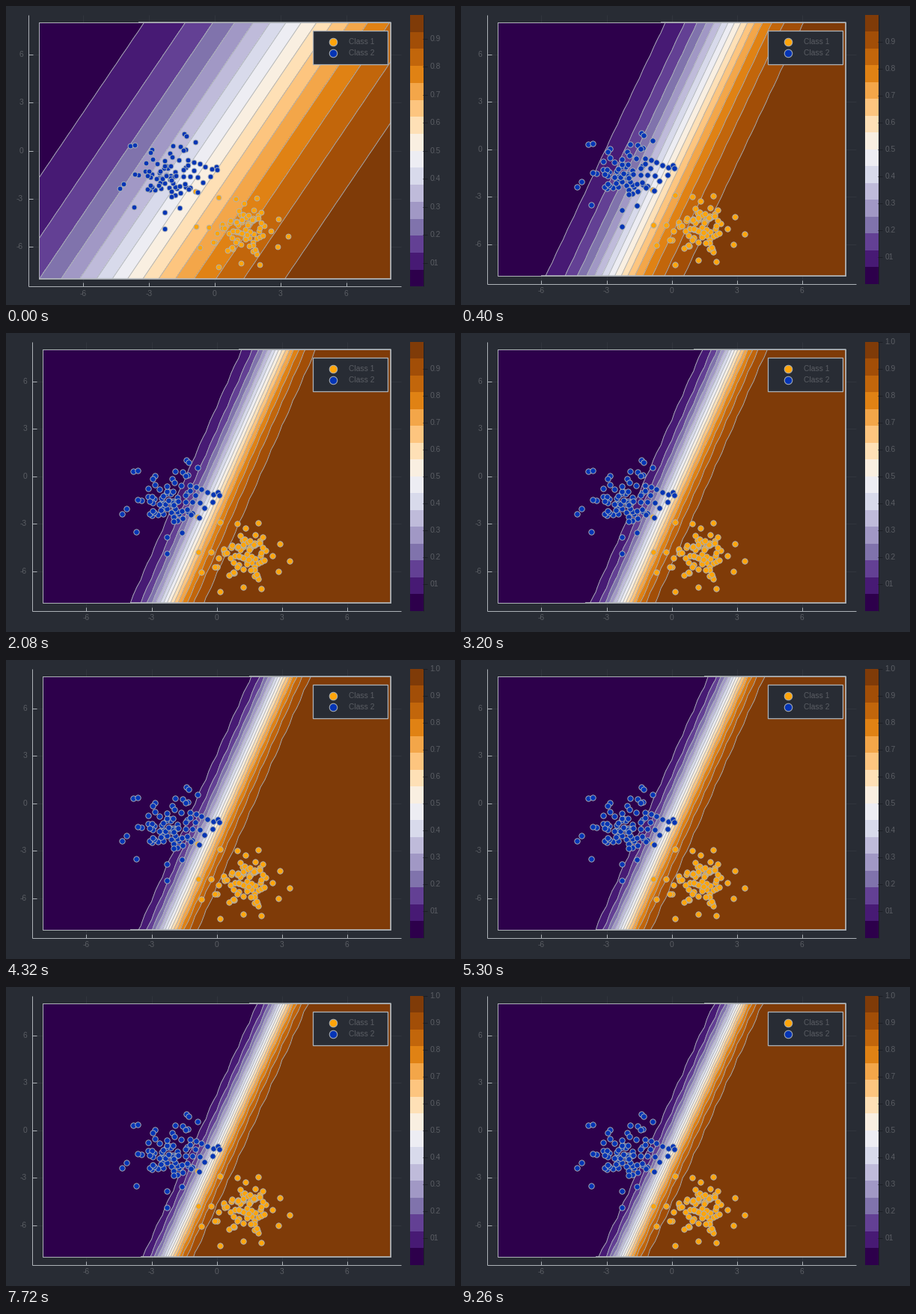
Write a matplotlib script that moves like this. It is 600 by 400 pixels and loops after 9.28 s.

```python
import numpy as np
import matplotlib.pyplot as plt
from matplotlib.animation import FuncAnimation
from matplotlib.collections import LineCollection
from matplotlib.patches import Rectangle

DPI = 100
PX = 72 / DPI                       # one pixel in points
BG, FG, TEXT, DARK = "#282c34", "#adb2b7", "#5a5d63", "#1b1e24"
ORANGE, BLUE = "#ffa50a", "#0535b5"
TICK_MS, LOOP_MS = 20, 9280
BANDS, TOP, RIGHT = 16, 12, 528
TICKS = np.arange(-6, 7, 3)

plt.rcParams["font.family"] = "Liberation Sans"
plt.rcParams["font.size"] = 10.3 * PX

fig = plt.figure(figsize=(6, 4), dpi=DPI, facecolor=BG)
ax = fig.add_axes([0, 0, 1, 1])
ax.set(xlim=(0, 600), ylim=(400, 0))
ax.axis("off")
ax.set_autoscale_on(False)

palette = plt.get_cmap("PuOr_r")(np.linspace(0, 1, BANDS))
grid = np.arange(-8, 8.01, 0.5)
gx, gy = np.meshgrid(grid, grid)


def add_lines(segs, width=1.0, color=FG, alpha=1.0, z=3):
    lc = LineCollection(segs, colors=color, linewidths=width * PX, alpha=alpha, zorder=z)
    return ax.add_collection(lc, autolim=False)


def cluster(seed, mean, spread, count, outer):
    """A round cloud of points plus a few outlying ones."""
    z = np.random.default_rng(seed).normal(size=(4 * count, 2))
    z = z[np.hypot(*z.T) < 1.95][:count]
    return np.vstack([mean + z * spread, outer])


class1 = cluster(12, (1.25, -4.9), (0.8, 0.9), 74, [
    (-0.85, -4.75), (0.95, -3.0), (1.9, -2.95), (2.9, -4.25), (3.35, -5.35), (2.85, -6.0),
    (0.15, -7.25), (2.05, -7.1), (-0.9, -2.55), (0.15, -2.9), (-0.7, -6.05), (1.2, -7.0)])
class2 = cluster(5, (-2.0, -1.3), (0.9, 0.85), 74, [
    (-4.35, -2.35), (-4.15, -2.05), (-3.85, 0.3), (-3.65, 0.35), (-3.7, -3.5), (-1.4, 1.05),
    (-1.3, 0.9), (-0.9, 0.55), (-2.3, -3.85), (-2.3, -4.85), (-1.6, -3.55), (-0.8, -2.6),
    (-0.2, -1.6), (-0.15, -1.15), (0.05, -1.0), (0.1, -1.2)])


class Layout:
    """Maps data units to stage pixels and owns the fixed artists."""

    def __init__(self, left, bottom, size):
        self.left, self.bottom = left, bottom
        self.cx, self.sx = (left + RIGHT) / 2, (RIGHT - left) / 16.96
        self.cy, self.sy = (TOP + bottom) / 2, (bottom - TOP) / 16.96
        self.artists = self.build(size)

    def x(self, v):
        return self.cx + self.sx * np.asarray(v)

    def y(self, v):
        return self.cy - self.sy * np.asarray(v)

    def build(self, size):
        l, b = self.left, self.bottom
        xs, ys = self.x(TICKS), self.y(TICKS)
        (x0, x1), (y0, y1) = self.x([-8, 8]), self.y([8, -8])
        out = [
            add_lines([[(x, TOP), (x, b)] for x in xs] + [[(l, y), (RIGHT, y)] for y in ys],
                      0.6, alpha=0.12, z=0),
            add_lines([[(l, TOP), (l, b)], [(l, b), (RIGHT, b)]]),
            add_lines([[(x, b), (x, b - 5)] for x in xs] + [[(l, y), (l + 6, y)] for y in ys]),
            add_lines([[(x0, y0), (x1, y0), (x1, y1), (x0, y1), (x0, y0)]]),
            add_lines([[(558, TOP), (558, b)]], 0.8, DARK)]
        for v, x, y in zip(TICKS, xs, ys):
            out += [ax.text(x - 0.5, b + 9.5, f"{v}", color=TEXT, ha="center", va="center"),
                    ax.text(l - 7.5, y, f"{v}", color=TEXT, ha="right", va="center")]
        step = (b - TOP) / BANDS
        for i, c in enumerate(palette):
            band = Rectangle((540, b - (i + 1) * step), 18, step, color=c, lw=0,
                             antialiased=False)
            out.append(ax.add_patch(band))
        for pts, color, z in ((class1, ORANGE, 4), (class2, BLUE, 5)):
            out.append(ax.scatter(self.x(pts[:, 0]), self.y(pts[:, 1]), s=(size * PX) ** 2,
                                  color=color, edgecolors=FG, linewidths=0.9 * PX, zorder=z))
        return out

    def show(self, on):
        for a in self.artists:
            a.set_visible(on)


first, later = Layout(30.4, 375.4, 6.8), Layout(35.4, 371.6, 7.4)

# Legend
ax.add_patch(Rectangle((410, 32.5), 100, 45.5, fc=BG, ec=FG, lw=1.3 * PX, zorder=6))
for y, color, name in ((47.7, ORANGE, "Class 1"), (62.7, BLUE, "Class 2")):
    ax.scatter(437, y, s=(10.5 * PX) ** 2, color=color, edgecolors=FG,
               linewidths=PX, zorder=7)
    ax.text(457.5, y, name, color=TEXT, va="center", zorder=7)

# Colorbar labels
bar_values = np.arange(1, 11) / 10
bar_texts = [ax.text(566.5, 0, "01" if v == 0.1 else f"{v:.1f}", color=TEXT, va="center")
             for v in bar_values]
bar_ticks = add_lines([], color=DARK)
edge = add_lines([], 1.6)


def weights(epoch):
    """Slopes along x and -y and the bias; training slows logarithmically."""
    s = np.log1p(epoch / 5)
    return (np.polyval([0.020, 0.51, 0.350], s),
            np.polyval([0.0185, 0.11, 0.173], s),
            np.polyval([-0.058, -0.07, 0.010], s))


def epoch_at(ms):
    """Three epochs per 140 ms, the middle one held for 100 ms."""
    cycle, rest = divmod(ms, 140)
    return 3 * cycle + (rest >= 20) + (rest >= 120)


state = {"epoch": None, "sets": []}


def draw_epoch(epoch):
    lay = first if epoch == 0 else later
    first.show(lay is first)
    later.show(lay is later)

    wx, wy, b = weights(epoch)
    z = 1 / (1 + np.exp(-(wx * gx - wy * gy + b)))
    lo, hi = z.min(), z.max()
    levels = np.linspace(lo, hi, BANDS + 1)
    fill = levels.copy()
    fill[0] -= 1e-6
    fill[-1] += 1e-6

    for old in state["sets"]:
        old.remove()
    px, py = lay.x(grid), lay.y(grid)
    state["sets"] = [
        ax.contourf(px, py, z, levels=fill, colors=palette, zorder=1),
        ax.contour(px, py, z, levels=levels[1:-1], colors=FG, linewidths=0.9 * PX, zorder=2)]

    # The frame is heavier beyond the first band
    top, low = [px[max(np.argmax(row >= levels[1]) - 1, 0)] for row in (z[-1], z[0])]
    edge.set_segments([[(top, py[-1]), (px[-1], py[-1]), (px[-1], py[0]), (low, py[0])]])

    ys = lay.bottom - (bar_values - lo) / (hi - lo) * (lay.bottom - TOP)
    full = bool(np.float32(hi) >= 1)      # single precision saturates
    for text, y in zip(bar_texts, ys):
        text.set_y(y)
    bar_texts[-1].set_visible(full)
    bar_ticks.set_segments([[(557, y), (563, y)] for y in (ys if full else ys[:-1])])


def update(i):
    epoch = epoch_at(i * TICK_MS)
    if epoch != state["epoch"]:
        draw_epoch(epoch)
        state["epoch"] = epoch
    return []


anim = FuncAnimation(fig, update, frames=LOOP_MS // TICK_MS, interval=TICK_MS,
                     repeat=True, repeat_delay=0, blit=False)
plt.show()
```
